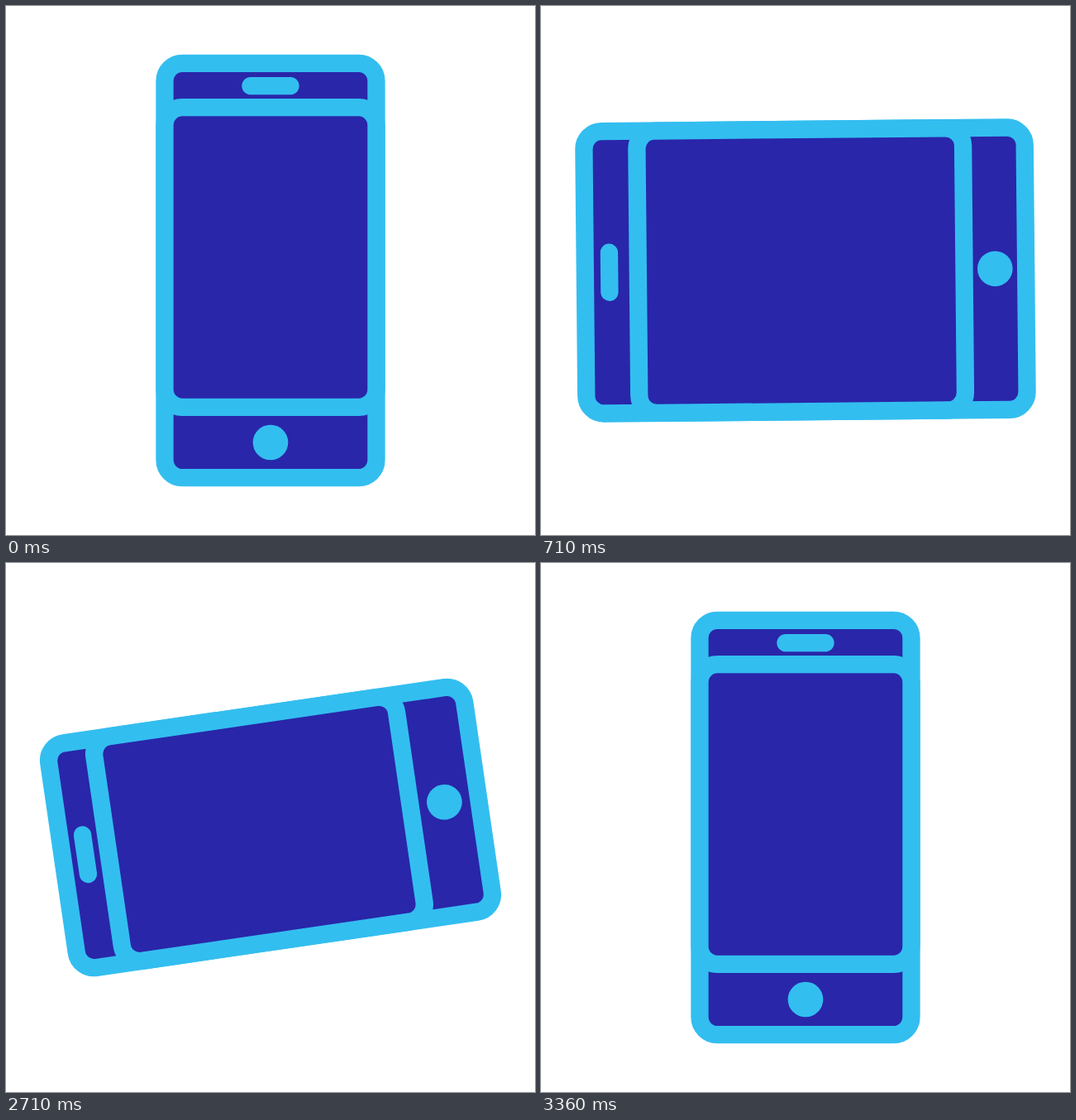
An HTML page for the animation above (4.78 s loop, 640 by 640 pixels).

```html
<!DOCTYPE html>
<html lang="en">
<head>
<meta charset="utf-8">
<title>Phone to tablet</title>
<style>
  html, body { margin: 0; height: 100%; overflow: hidden; background: #fff; }
  svg { display: block; width: 100vw; height: 100vh; }
</style>
</head>
<body>
<svg viewBox="-30 -30 60 60">
  <g id="device" fill="#2926a9" stroke="#33bef0" stroke-width="2" stroke-linecap="round">
    <rect id="body" rx="2"/>
    <rect id="screen" rx="2"/>
    <path id="speaker"/>
    <circle id="button" r="2" fill="#33bef0" stroke="none"/>
  </g>
</svg>
<script>
const LOOP = 4780;
const RETURN_TICK = 48;
const [device, body, screenRect, speaker, button] =
  ['device', 'body', 'screen', 'speaker', 'button'].map(id => document.getElementById(id));

const mix = (a, b, p) => a + (b - a) * p;

function setAttrs(element, attrs) {
  for (const name in attrs) element.setAttribute(name, attrs[name]);
}

// cubic-bezier(a, -b, 1 - a, 1 + b): pulls back first, then overshoots
function backEase(t, a, b) {
  if (t <= 0) return 0;
  if (t >= 1) return 1;
  const curve = (s, p, q) => 3 * s * (1 - s) ** 2 * p + 3 * s * s * (1 - s) * q + s ** 3;
  let low = 0, high = 1;
  for (let i = 0; i < 30; i++) {
    const mid = (low + high) / 2;
    if (curve(mid, a, 1 - a) < t) low = mid; else high = mid;
  }
  return curve(low, -b, 1 + b);
}

// Motion runs in 1/20 s ticks, shown at 14 pictures per second
function tickAt(ms) {
  const picture = Math.floor((Math.floor(ms / 10) * 10 + 5) * 14 / 1000);
  return Math.ceil(picture * 10 / 7);
}

function draw(ms) {
  const tick = tickAt(ms);
  const returning = tick >= RETURN_TICK;
  const n = returning ? tick - RETURN_TICK : tick;
  let size = backEase(n / 12, 0.58, 0.54);
  let turn = backEase((n - 5) / 14, 0.48, 0.55);
  if (returning) {
    size = 1 - size;
    turn = 1 - turn;
  }

  const width = mix(24, 32, size);
  const height = mix(47, 50, size);
  const screenTop = mix(-18.5, -19, size);
  const screenBottom = mix(15.5, 18, size);

  setAttrs(device, { transform: `rotate(${-90 * turn})` });
  setAttrs(body, { x: -width / 2, y: -height / 2, width, height });
  setAttrs(screenRect, { x: -width / 2, y: screenTop, width, height: screenBottom - screenTop });
  setAttrs(speaker, { d: `M-2.25 ${mix(-20.94, -22.25, size)}h4.5` });
  setAttrs(button, { cy: mix(19.5, 21.5, size) });
}

const start = performance.now();
function frame() {
  draw((performance.now() - start) % LOOP);
  requestAnimationFrame(frame);
}
frame();
</script>
</body>
</html>
```
